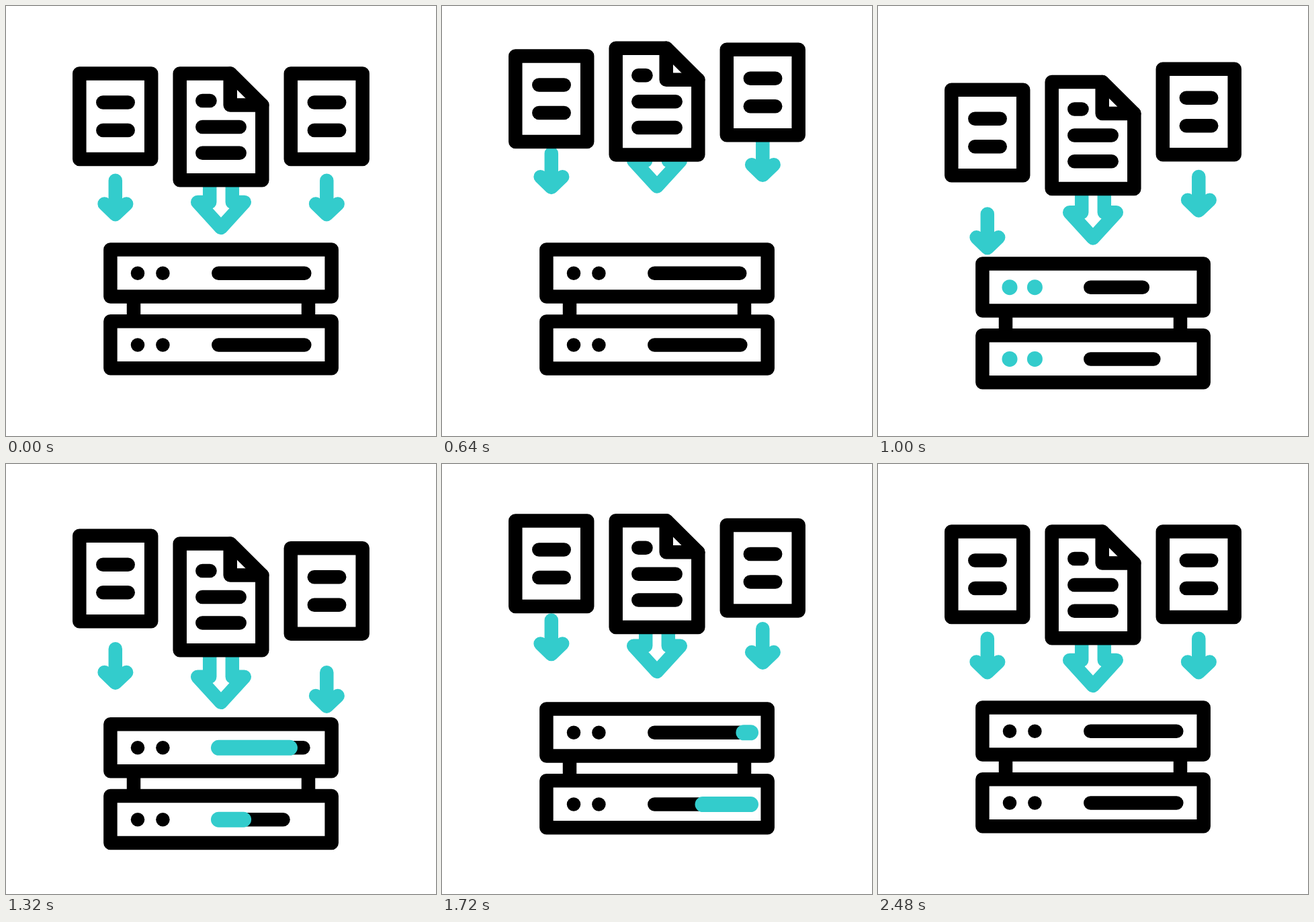
Animation of 640x640 px, one loop 3 s. Source, as an HTML page with a canvas:

```html
<!DOCTYPE html>
<html lang="en">
<head>
<meta charset="utf-8">
<title>Documents to server</title>
<style>
html, body { margin: 0; height: 100%; overflow: hidden; background: #fff; }
canvas { display: block; }
</style>
</head>
<body>
<canvas id="stage" width="640" height="640"></canvas>
<script>
const ctx = document.getElementById('stage').getContext('2d');
const BLACK = '#000', TEAL = '#33cccc', WEIGHT = 20.5;
const LOOP = 3000, STEP = 40, REST = 2480, STAGGER = 120;

// Keyframes are [time, value] pairs
const swing = (up, down, up2) => [[0, 0], [480, up], [1040, down], [1640, up2], [2240, 0]];
const docMove = swing(-38.7, 25.3, -16.8);
const arrowMove = swing(-63, 51.5, -28.5);
const bigArrowMove = swing(-63, 34.8, -21.8);
const serverMove = [[620, 0], [1150, 26], [1240, 26], [1820, 0]];
const barEnd = [[600, 444.3], [1080, 389.8], [1350, 444.3]];
const fillHead = [[1080, 316.5], [1440, 459.5]];
const fillTail = [[1420, 316.5], [1780, 459.5]];

function ease(keys, t) {
  if (t <= keys[0][0]) return keys[0][1];
  for (let i = 1; i < keys.length; i++) {
    const [t0, a] = keys[i - 1], [t1, b] = keys[i];
    if (t < t1) {
      const p = (t - t0) / (t1 - t0);
      return a + (b - a) * p * p * (3 - 2 * p);
    }
  }
  return keys[keys.length - 1][1];
}

function shape(d, color = BLACK, fill, weight = WEIGHT) {
  const path = new Path2D(d);
  if (fill) {
    ctx.fillStyle = fill;
    ctx.fill(path);
  }
  ctx.strokeStyle = color;
  ctx.lineWidth = weight;
  ctx.stroke(path);
}

function line(x1, x2, y, color, weight) {
  shape(`M${x1} ${y}H${x2}`, color, null, weight);
}

function shifted(x, y, draw) {
  ctx.save();
  ctx.translate(x, y);
  draw();
  ctx.restore();
}

function smallDoc() {
  shape('M109.3 100.5H216.2V228H109.3Z', BLACK, '#fff');
  line(144.3, 181.7, 143.5);
  line(144.3, 181.7, 185);
}

function bigDoc() {
  shape('M258.7 100.5H334L381.3 147.5V259.3H258.7Z', BLACK, '#fff');
  shape('M333.7 100.5V147.5H381.3');
  line(292.3, 303.5, 141);
  line(292.3, 347.7, 180);
  line(292.3, 347.7, 218.7);
}

const smallArrow = () => shape('M162.8 259.7V310M146.6 294.5L162.8 310.2L179.2 294.5', TEAL);
const bigArrow = () =>
  shape('M303.2 256V291.9H285.2L320 330L354.8 291.9H336.8V256', TEAL);

// Lights come on one after another, once a second from 760 ms
function isLit(index, t) {
  const since = t - 760 - index * 80;
  return since >= 0 && since % 1000 < 280 && since < 2000;
}

function unit(row, t) {
  const local = t - row * STAGGER;
  shape('M155.4 362.5H484.7V432.5H155.4Z', BLACK, '#fff');
  [196, 233.4].forEach((x, i) => {
    const lit = isLit(row * 2 + i, t);
    line(x, x + 0.01, 397.7, lit ? TEAL : BLACK, lit ? 23 : WEIGHT);
  });
  line(316.3, ease(barEnd, local), 397.7);
  const head = ease(fillHead, local), tail = ease(fillTail, local);
  if (head > tail) line(tail, head, 397.7, TEAL, 23);
}

function render(t) {
  ctx.fillStyle = '#fff';
  ctx.fillRect(0, 0, 640, 640);
  ctx.lineCap = ctx.lineJoin = 'round';

  shifted(0, ease(serverMove, t), () => {
    shape('M190 440V462M450 440V462');
    unit(0, t);
    shifted(0, 106.8, () => unit(1, t));
  });

  const mid = t - STAGGER, late = t - 2 * STAGGER;
  shifted(0, ease(arrowMove, t), smallArrow);
  shifted(0, ease(bigArrowMove, mid), bigArrow);
  shifted(314.5, ease(arrowMove, late), smallArrow);
  shifted(0, ease(docMove, t), smallDoc);
  shifted(0, ease(docMove, mid), bigDoc);
  shifted(314.5, ease(docMove, late), smallDoc);
}

function tick() {
  const t = performance.now() % LOOP;
  render(Math.min(Math.floor(t / STEP) * STEP, REST));
  requestAnimationFrame(tick);
}
tick();
</script>
</body>
</html>
```
